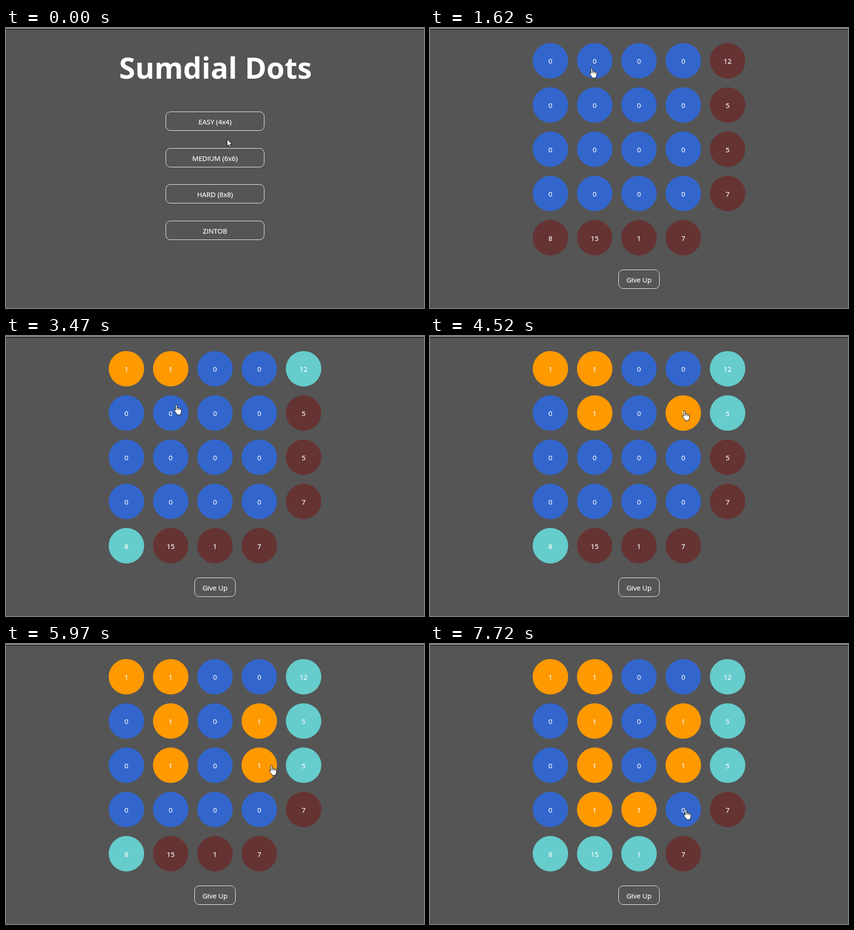
These frames come from a looping animation (914 px wide and 613 px high, 8 s). An HTML page:

```html
<!DOCTYPE html>
<html lang="en">
<head>
<meta charset="utf-8">
<title>Sumdial Dots</title>
<style>
  html, body { margin: 0; width: 100%; height: 100%; overflow: hidden; background: #555; }
  svg { display: block; width: 914px; height: 613px; }
  text { font: 15px "Open Sans", "Noto Sans", sans-serif; fill: #fff; stroke: #fff; stroke-width: .25px; text-anchor: middle; }
  .title { font-size: 64px; font-weight: 700; stroke: none; }
  .btn { fill: transparent; stroke: #fff; }
  .hover { fill: #777; }
  .off { fill: #36c; }
  .on { fill: #f90; }
  .sum { fill: #633; }
  .done { fill: #6cc; }
  .cursor { fill: #fff; stroke: #000; stroke-linejoin: round; }
</style>
</head>
<body>
<svg viewBox="0 0 914 613">
  <rect width="914" height="613" fill="#555"/>
  <rect width="914" height="1" fill="#eee"/>
  <rect y="1" width="914" height="3" fill="#333"/>
  <g id="menu"><text class="title" x="458" y="111">Sumdial Dots</text></g>
  <g id="game"></g>
  <path id="arrow" class="cursor" d="M.5 .5V15.5L3.9 12.3L6.3 18L8.8 17L6.4 11.5H11Z"/>
  <g id="hand" class="cursor">
    <path d="M4 13V2.2Q4 .6 5.6 .6T7.2 2.2V8Q7.2 7 8.6 7T10.4 8.5Q10.6 7.8 11.8 7.9T13.4 9.6Q13.8 9 14.8 9.2T16.4 11V15.5Q16.4 17.5 15 19.5V22.4H6.6V20.5Q4.5 18.5 2.6 15.6L.9 13Q.4 11.6 1.6 11.1T4 13Z"/>
    <path d="M7.2 8V12M10.4 8.5V12.3M13.4 9.6V12.6" fill="none"/>
  </g>
</svg>
<script>
const LOOP = 8000, START = 670, HOVER = 280;
const STEP = 50, PHASE = 20;
const PAUSE = 150; // rest on a cell before the click
const LEFT = 263.3, TOP = 71.7, PITCH = 96.85, RADIUS = 38.8;

const byId = id => document.getElementById(id);
const menu = byId('menu'), game = byId('game'), arrow = byId('arrow'), hand = byId('hand');
const show = (el, visible) => { el.style.display = visible ? '' : 'none'; };
const setClass = (el, name) => el.setAttribute('class', name);
const moveTo = (el, x, y) => el.setAttribute('transform', `translate(${x} ${y})`);

function add(parent, tag, attrs, label) {
  const el = document.createElementNS('http://www.w3.org/2000/svg', tag);
  for (const key in attrs) el.setAttribute(key, attrs[key]);
  if (label !== undefined) el.textContent = label;
  return parent.appendChild(el);
}

function button(parent, label, y, width) {
  const box = add(parent, 'rect', { class: 'btn', x: 457 - width / 2, y, width, height: 41, rx: 10 });
  add(parent, 'text', { x: 457, y: y + 27.5 }, label);
  return box;
}

function disc(row, col, label) {
  const x = LEFT + col * PITCH, y = TOP + row * PITCH;
  return {
    circle: add(game, 'circle', { cx: x, cy: y, r: RADIUS }),
    text: add(game, 'text', { x, y: y + 6.5 }, label)
  };
}

const [easy] = ['EASY (4x4)', 'MEDIUM (6x6)', 'HARD (8x8)', 'ZINTOB'].map(
  (label, i) => button(menu, label, Math.round(183 + i * 79.5) + .5, 215));
button(game, 'Give Up', 529.5, 89);

const rowGoals = [12, 5, 5, 7], colGoals = [8, 15, 1, 7];
const cells = rowGoals.map((_, r) => colGoals.map((_, c) => disc(r, c, 0)));
const rowSums = rowGoals.map((n, r) => disc(r, 4, n));
const colSums = colGoals.map((n, c) => disc(4, c, n));

// The pointer leaves each stop at its time; a click flips the cell beneath it.
const pass = (time, x, y) => ({ time, x, y, arrive: time });
const click = (time, x, y) => ({
  time, x, y, arrive: time - PAUSE,
  row: Math.round((y - TOP) / PITCH), col: Math.round((x - LEFT) / PITCH)
});
const stops = [
  pass(180, 483, 243), pass(330, 466, 204), pass(1320, 466, 204), pass(1620, 353, 87),
  click(2220, 267, 72), pass(2470, 443, 76), click(3120, 372, 70),
  click(3720, 372, 154), click(4520, 556, 163), click(5220, 372, 250),
  click(5870, 586, 263), pass(6470, 265, 361), click(6870, 339, 359),
  click(7370, 451, 361), pass(7720, 559, 362)
];
const clicks = stops.filter(stop => 'row' in stop);

const ease = p => p < .5 ? 4 * p ** 3 : 1 - 4 * (1 - p) ** 3;

function pointer(t) {
  const i = stops.findIndex(stop => stop.time > t);
  if (i < 1) return i ? stops[stops.length - 1] : stops[0];
  const from = stops[i - 1], to = stops[i];
  const p = ease(Math.min(1, (t - from.time) / (to.arrive - from.time)));
  const mix = (a, b) => Math.round(a + (b - a) * p);
  return { x: mix(from.x, to.x), y: mix(from.y, to.y) };
}

const binary = bits => bits.reduce((n, bit) => n * 2 + bit, 0);

function drawBoard(t) {
  const bits = cells.map(row => row.map(() => 0));
  for (const { time, row, col } of clicks) if (t >= time) bits[row][col] = 1;
  cells.forEach((row, r) => row.forEach((cell, c) => {
    setClass(cell.circle, bits[r][c] ? 'on' : 'off');
    cell.text.textContent = bits[r][c];
  }));
  const mark = (sum, line, goal) =>
    setClass(sum.circle, binary(line) === goal ? 'done' : 'sum');
  rowSums.forEach((sum, r) => mark(sum, bits[r], rowGoals[r]));
  colSums.forEach((sum, c) => mark(sum, bits.map(row => row[c]), colGoals[c]));
}

function draw(t) {
  const { x, y } = pointer(Math.floor((t - PHASE) / STEP) * STEP + PHASE);
  show(menu, t < START);
  show(game, t >= START);
  show(arrow, t < HOVER);
  show(hand, t >= HOVER);
  setClass(easy, t >= HOVER ? 'btn hover' : 'btn');
  moveTo(arrow, x, y);
  moveTo(hand, x - 5, y);
  drawBoard(t);
}

const begin = performance.now();
function tick() {
  draw((performance.now() - begin) % LOOP);
  requestAnimationFrame(tick);
}
tick();
</script>
</body>
</html>
```
